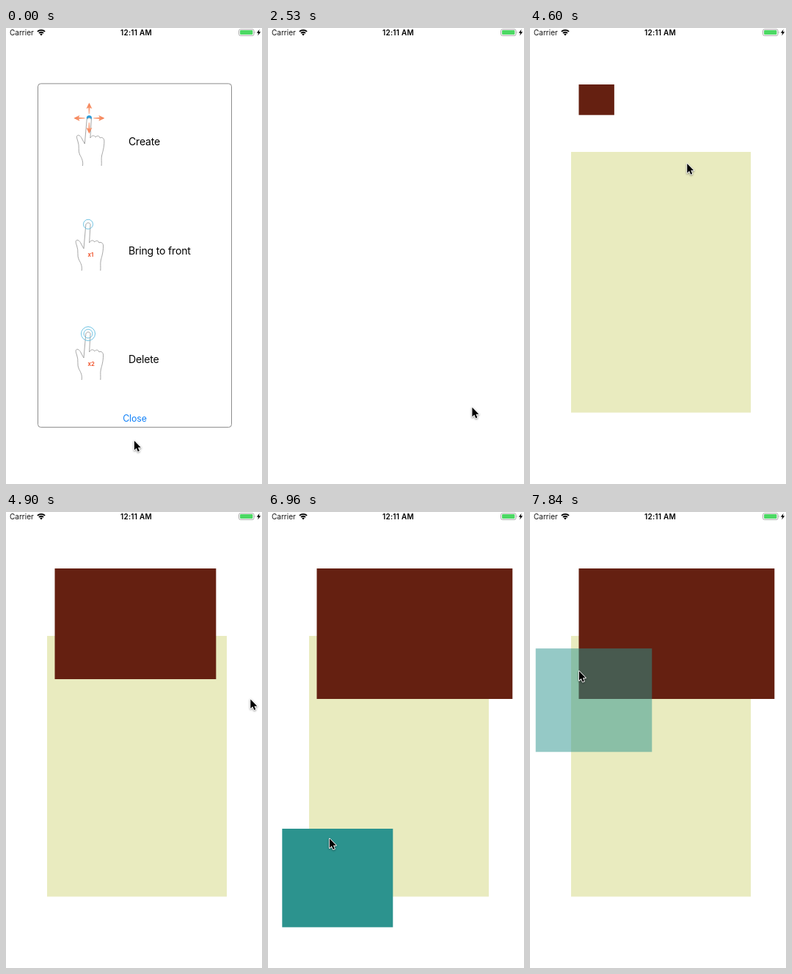
Write an HTML page with a canvas that moves like this. It is 349x622 px and loops after 7.99 s.

```html
<!DOCTYPE html>
<html lang="en">
<head>
<meta charset="utf-8">
<title>Create, bring to front, delete</title>
<style>
  html, body { margin: 0; width: 100%; height: 100%; overflow: hidden; background: #fff; }
  svg, canvas { position: absolute; left: 0; top: 0; width: 349px; height: 622px; }
  text { font-family: Inter, Roboto, sans-serif; }
  .label { font-size: 14.1px; letter-spacing: -0.2px; fill: #000; }
  .taps { font-size: 7.6px; font-weight: 700; fill: #f0562f; }
  .ring { fill: none; stroke: #5fbde0; stroke-width: .9; }
</style>
</head>
<body>
<svg viewBox="0 0 349 622">
  <defs>
    <linearGradient id="fade" gradientUnits="userSpaceOnUse" x1="0" y1="-21" x2="0" y2="-5">
      <stop offset="0" stop-color="#f47a4b"/>
      <stop offset=".5" stop-color="#f79a74"/>
      <stop offset="1" stop-color="#fbd3c2"/>
    </linearGradient>
    <path id="arrow" fill="url(#fade)" d="M0-21L4-13L1-14V-6H-1V-14L-4-13Z"/>
    <path id="hand" transform="scale(.95 1)" fill="#fff" stroke="#a0a0a0" stroke-width=".95" stroke-linejoin="round" d="
      M-9 65C-8 59-10 55-13 50C-16 45-13 38-16 31C-17 28-18 26-17 24C-15 22-12 24-10 28
      L-6 35L-3 2C-2-1 3-1 3.5 2L2 27C4 23 8 23 9.5 26C12 23 15 24 16 27
      C19 25 22 28 22 31C22 40 20 45 18.5 51C17.5 55 18.5 60 18 65"/>
  </defs>

  <text x="5" y="10" font-size="10" fill="#111">Carrier</text>
  <g fill="none" stroke="#000" stroke-width="1.8">
    <path d="M42.9 4.9A7.2 7.2 0 0 1 53.1 4.9M45 7A4.2 4.2 0 0 1 51 7"/>
    <path fill="#000" stroke="none" d="M48 10.4L46.2 8.5A2.5 2.5 0 0 1 49.8 8.5Z"/>
  </g>
  <text x="177.5" y="10" font-size="10" font-weight="600" letter-spacing=".25" text-anchor="middle">12:11 AM</text>
  <rect x="317.5" y="1.8" width="20.5" height="8.6" rx="2" fill="none" stroke="#a9a9a9"/>
  <rect x="319" y="3.1" width="17.4" height="6" rx="1" fill="#4cd964"/>
  <path d="M338.9 4.6Q340.6 6.1 338.9 7.6Z" fill="#a9a9a9"/>
  <path d="M345.6 1.8L341.8 6.8H344.2L343.2 10.4L347.2 5.3H344.7Z" fill="#000"/>

  <g id="dialog">
    <rect x="43.5" y="75.9" width="264" height="468.7" rx="4" fill="#fff" stroke="#8c8c8c"/>
    <circle cx="113.4" cy="122.8" r="3.6" fill="#2a9bd8"/>
    <use href="#hand" x="113" y="123"/>
    <g transform="translate(113.4 123)">
      <use href="#arrow"/>
      <use href="#arrow" transform="rotate(90)"/>
      <use href="#arrow" transform="rotate(180)"/>
      <use href="#arrow" transform="rotate(270)"/>
    </g>
    <text class="label" x="167" y="160">Create</text>

    <use href="#hand" x="111.7" y="266"/>
    <circle class="ring" cx="112" cy="267.7" r="6.5"/>
    <text class="taps" x="111.5" y="312">x1</text>
    <text class="label" x="167" y="308.5">Bring to front</text>

    <use href="#hand" x="111.7" y="415"/>
    <circle class="ring" cx="112" cy="417" r="6"/>
    <circle class="ring" cx="112" cy="417" r="9.5"/>
    <text class="taps" x="111.5" y="461">x2</text>
    <text class="label" x="167" y="457.3">Delete</text>

    <text x="175.5" y="537" font-size="12.4" letter-spacing="-0.1" text-anchor="middle" fill="#1080f8">Close</text>
  </g>
</svg>
<canvas id="stage"></canvas>

<script>
const LOOP = 7990, ORIGIN = 2230, STEP = 147.63;
const dialog = document.getElementById('dialog');
const canvas = document.getElementById('stage');
const ctx = canvas.getContext('2d');
const dpr = window.devicePixelRatio || 1;
canvas.width = 349 * dpr;
canvas.height = 622 * dpr;

// Pointer moves, timed in steps. A move with a colour drags out a card,
// whose corner trails the pointer by `lag`; `bow` bends the path.
const home = [174.5, 562.5];
const moves = [
  { start: -10.5, len: 4.5, to: [166.5, 523.5] },
  { start: -1, len: 3, to: [278, 517] },
  { start: 2, len: 1.35, to: [301, 524.6] },
  { start: 3.35, len: 5, to: [56, 169], bow: 1.5, lag: 0.07, color: '#e9ebbf' },
  { start: 9, len: 4.6, to: [66.5, 77] },
  { start: 13.6, len: 4.5, to: [333.3, 255], bow: 0.85, lag: 1.14, color: '#652011' },
  { start: 20, len: 2.46, to: [170.3, 566.4] },
  { start: 22.46, len: 4.5, to: [19.3, 432], lag: 1.1, color: '#2c938e' },
  { start: 27.5, len: 4.5, to: [83.5, 445] },
  { start: 33.5, len: 4.5, to: [66.5, 216.5] }
];
moves.forEach((m, i) => m.from = i ? moves[i - 1].to : home);
const cards = moves.filter(m => m.color);
const carry = moves[moves.length - 1];
const CARRY_X = -7.8, CARRY_Y = -242.5;

const clamp = v => Math.min(1, Math.max(0, v));
const ease = p => Math.sin(clamp(p) * Math.PI / 2) ** 2;
const progress = (m, k) => ease((k - m.start) / m.len);

function place(m, k) {
  const e = progress(m, k), [x, y] = m.from;
  return [x + (m.to[0] - x) * e, y + (m.to[1] - y) * e ** (m.bow || 1)];
}

function drawCard(card, k) {
  const [ax, ay] = card.from, [x, y] = place(card, k - card.lag);
  const held = card === cards[cards.length - 1];
  const moved = held ? progress(carry, k) : 0;
  const lift = held ? clamp((k - 33) / 2) : 0;
  const scale = 1 + 0.05 * lift;
  const w = Math.abs(ax - x) * scale, h = Math.abs(ay - y) * scale;
  const cx = (ax + x) / 2 + CARRY_X * moved, cy = (ay + y) / 2 + CARRY_Y * moved;
  ctx.globalAlpha = 1 - 0.5 * lift;
  ctx.fillStyle = card.color;
  ctx.fillRect(cx - w / 2, cy - h / 2, w, h);
  ctx.globalAlpha = 1;
}

const arrow = new Path2D('M0 0V14.4L3.3 11.3L5.6 16.6L7.9 15.6L5.7 10.5H10.2Z');

function drawPointer(x, y) {
  ctx.save();
  ctx.translate(x + 0.4, y + 0.6);
  ctx.scale(0.88, 0.88);
  ctx.lineJoin = 'round';
  ctx.lineWidth = 2;
  ctx.strokeStyle = '#fff';
  ctx.shadowColor = 'rgba(0,0,0,.45)';
  ctx.shadowBlur = 2.5 * dpr;
  ctx.shadowOffsetY = dpr;
  ctx.stroke(arrow);
  ctx.shadowColor = 'transparent';
  ctx.fillStyle = '#000';
  ctx.fill(arrow);
  ctx.restore();
}

function render(t) {
  const k = Math.min(38, Math.floor((t - ORIGIN + 8) / STEP));
  dialog.style.display = k < -2 ? '' : 'none';
  ctx.setTransform(dpr, 0, 0, dpr, 0, 0);
  ctx.clearRect(0, 0, 349, 622);
  for (const card of cards) drawCard(card, k);
  const move = moves.filter(m => m.start <= k).pop() || moves[0];
  drawPointer(...place(move, k));
}

const start = performance.now();
function tick() {
  render((performance.now() - start) % LOOP);
  requestAnimationFrame(tick);
}
tick();
</script>
</body>
</html>
```
